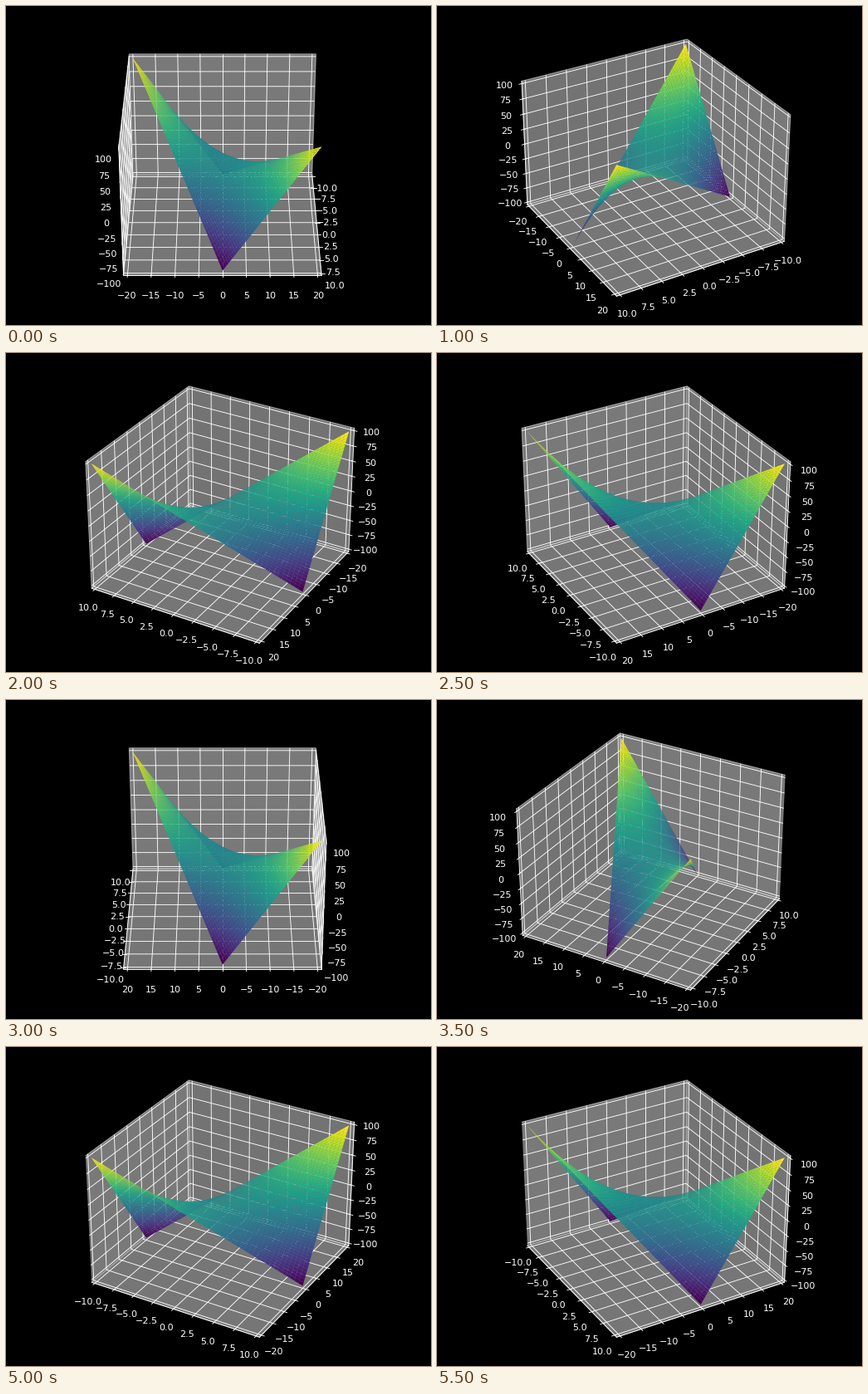
Write a matplotlib script that moves like this. It is 512 px wide and 384 px high and loops after 6000 ms.

```python
import matplotlib.pyplot as plt
import numpy as np
from matplotlib.animation import FuncAnimation

FRAMES = 12
LOOP_MS = 6000
PAD = 1 / 32

plt.style.use("dark_background")
plt.rcParams["font.family"] = "DejaVu Sans"

fig = plt.figure(figsize=(6.4, 4.8), dpi=80)
fig.subplots_adjust(left=PAD, right=1 - PAD, bottom=PAD, top=1 - PAD)
ax = fig.add_subplot(projection="3d")
ax.margins(0)

# Sheared saddle: (u, u + v, u * v)
side = np.linspace(-10, 10, 50)
u, v = np.meshgrid(side, side)
ax.plot_surface(u, u + v, u * v, cmap="viridis")


def update(frame):
    ax.view_init(elev=30, azim=frame * 360 / FRAMES)
    return ()


anim = FuncAnimation(fig, update, frames=FRAMES, interval=LOOP_MS / FRAMES,
                     repeat=True, repeat_delay=0)
plt.show()
```
